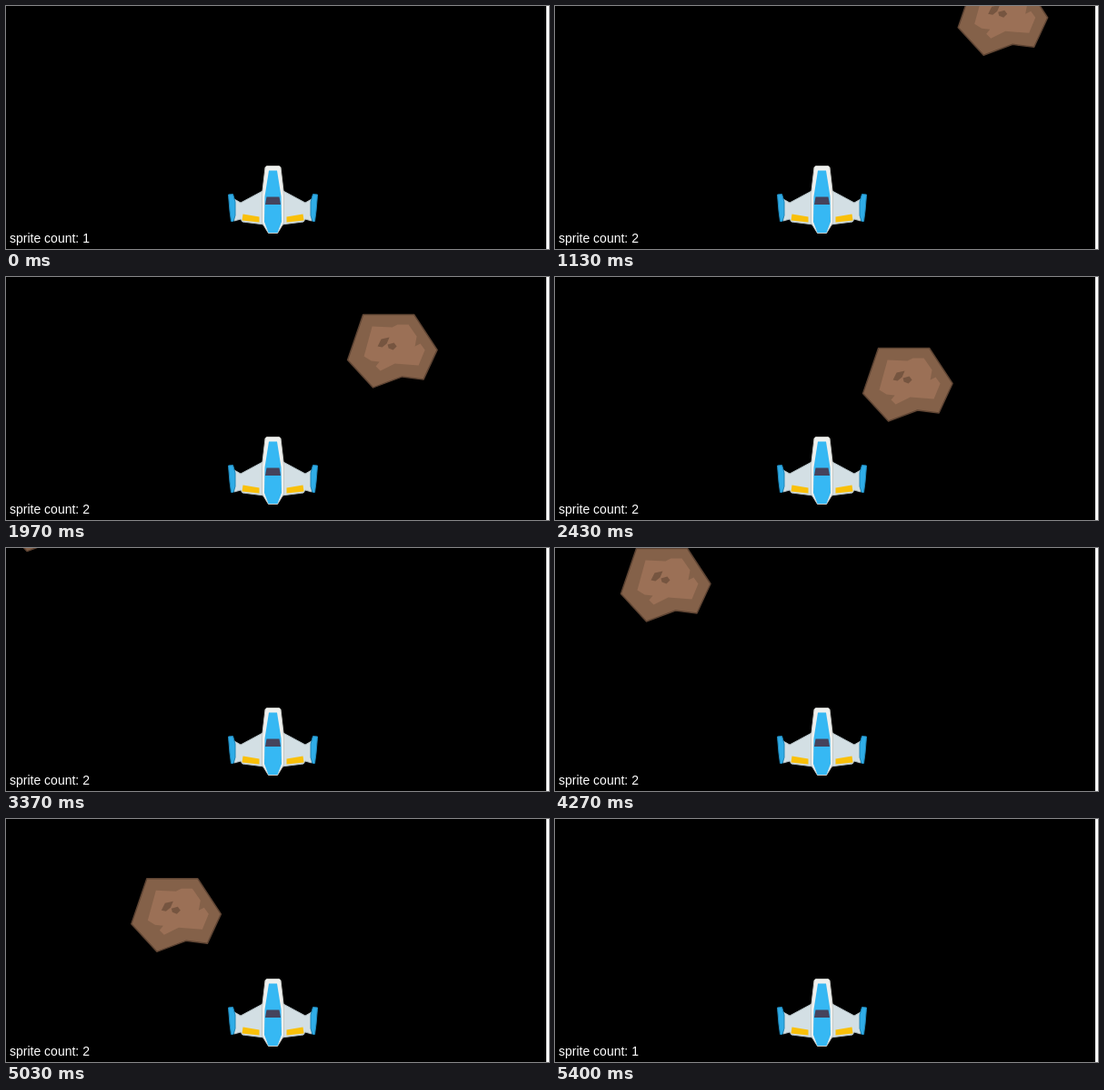
An HTML page for the animation above (5.81 s loop, 597x268 px).

```html
<!DOCTYPE html>
<html>
<head>
<meta charset="utf-8">
<style>
  html, body { margin: 0; height: 100%; overflow: hidden; background: #fff; }
  svg { display: block; background: #000; }
  text { font: 14px "Liberation Sans", Arial, sans-serif; fill: #fff; }
</style>
</head>
<body>
<svg width="594" height="268" stroke-linejoin="round">
  <defs>
    <!-- left half of the ship, mirrored around x = 293.5 -->
    <g id="wing">
      <path d="M284 203L258 217 251 213V237L258 235 260 238 284 241Z" fill="#d3dfe4" stroke="#b3c0c5"/>
      <path d="M260.500 229.500L278.500 232.500V238.500L259.500 236.500Z" fill="#f9c00a"/>
      <path d="M244.500 208L249.500 207.500 252 216V231L250 237.500H247.500L246 226Z" fill="#2fadE8" stroke="#1f86b8"/>
    </g>
  </defs>
  <g id="rock">
    <path d="M18 1H74L99.500 40 84.500 72.500 61 69.500 29 81.500 1 51Z" fill="#846149" stroke="#5e4433" stroke-width="1.500"/>
    <path d="M28 14L50 15 56 12H68L77 25 75 36 81 33 86 40 79 57 53 55 37 63 32 58 36 53 27 52 19 47Z" fill="#9b7056"/>
    <path d="M34 36L38 28 47 26 44 33 39 37ZM45 34L52 32 55 36 51 40 46 38Z" fill="#765540"/>
  </g>
  <use href="#wing"/>
  <use href="#wing" transform="matrix(-1 0 0 1 587 0)"/>
  <path d="M286.500 176.500H300.500L302 178 305.500 208V239L298.500 250.500H288.500L281.500 239V208L285 178Z" fill="#eff1ef" stroke="#c8c9c5"/>
  <path d="M289 181.500H298L302.500 210 303 238 298.500 250H288.500L284 238 284.500 210Z" fill="#36b8f3"/>
  <path d="M286.500 210.500H300.500L302 219H285Z" fill="#45435c"/>
  <text id="label" x="4" y="261"></text>
</svg>
<script>
const LOOP = 5810;
const START_Y = -78;
const rock = document.getElementById("rock");
const label = document.getElementById("label");

// Rocks drift diagonally at constant speed (px per ms); x = x0 + dir * y.
const flights = [
  { from: 500, to: 2630, speed: 0.0805, x0: 415, dir: -1 },
  { from: 3370, to: 5400, speed: 0.086, x0: 72, dir: 1 }
];

function draw(t) {
  const flight = flights.find(f => t >= f.from && t < f.to);
  rock.setAttribute("visibility", flight ? "visible" : "hidden");
  label.textContent = "sprite count: " + (flight ? 2 : 1);
  if (!flight) return;
  const y = START_Y + flight.speed * (t - flight.from);
  rock.setAttribute("transform", `translate(${flight.x0 + flight.dir * y} ${y})`);
}

const start = performance.now();
function tick() {
  draw((performance.now() - start) % LOOP);
  requestAnimationFrame(tick);
}
tick();
</script>
</body>
</html>
```
